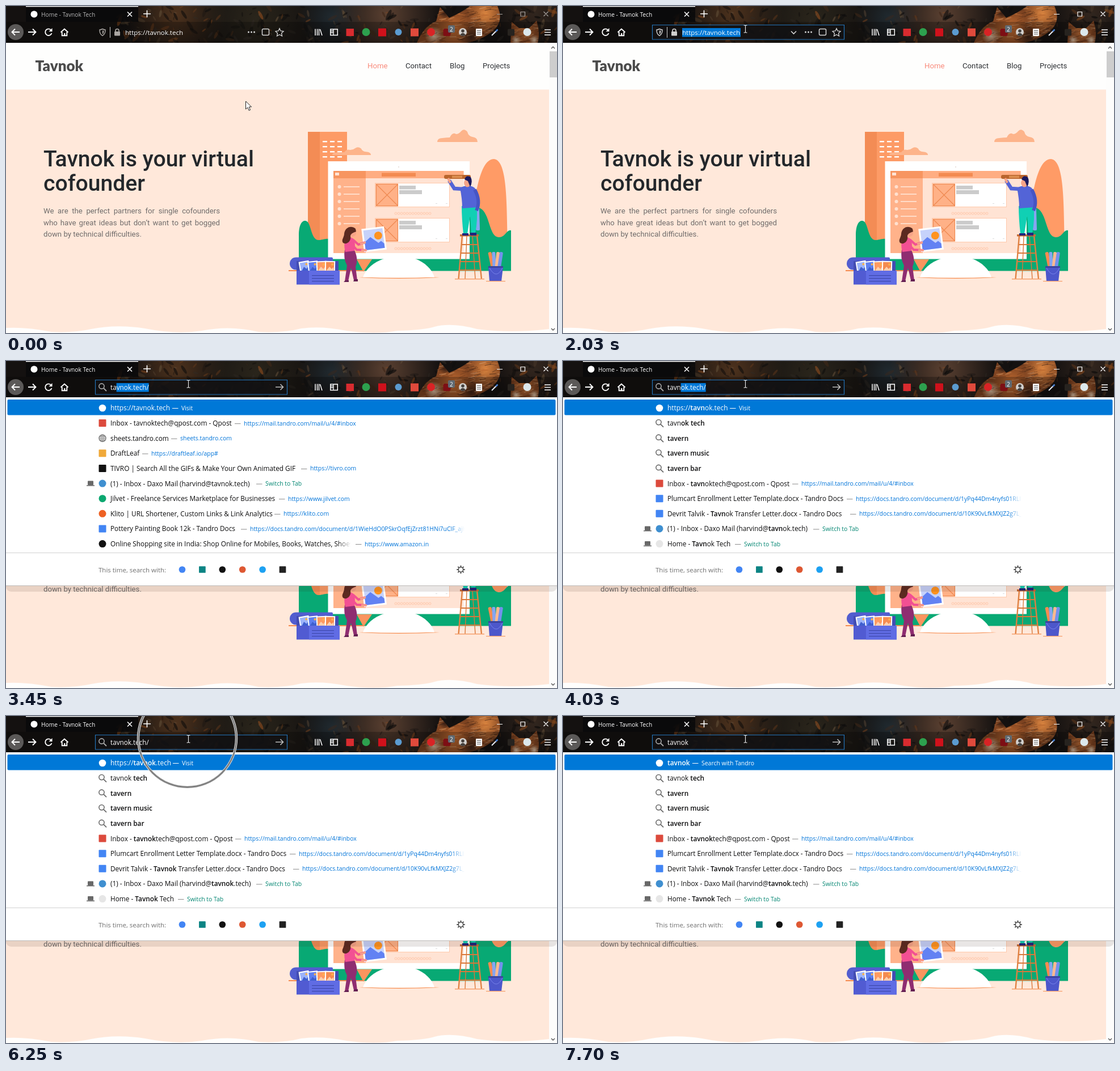
An HTML page with a canvas for the animation above (8000 ms loop, 971 by 577 pixels).

```html
<!DOCTYPE html>
<html lang="en">
<head>
<meta charset="utf-8">
<title>Address bar autofill</title>
<style>
html, body { margin: 0; width: 100%; height: 100%; overflow: hidden; background: #fff; }
canvas { display: block; width: 971px; height: 577px; }
</style>
</head>
<body>
<canvas id="stage" width="971" height="577"></canvas>
<script>
const W = 971, H = 577, LOOP = 8000;
const UI = '"Open Sans", sans-serif', WEB = 'Roboto, sans-serif';
const BLUE = '#0078d7', LINK = '#0074d9', GREEN = '#008571', GREY = '#6a6a6a';
const NAME = 'tavnok', SITE = 'https://tavnok.tech';
const stage = document.getElementById('stage').getContext('2d');
let c = stage;

// Drawing helpers
const rect = (x, y, w, h, color, r = 0) => {
  c.fillStyle = color;
  c.beginPath();
  c.roundRect(x, y, w, h, r);
  c.fill();
};
const disc = (x, y, r, color, ry = r) => {
  c.fillStyle = color;
  c.beginPath();
  c.ellipse(x, y, r, ry, 0, 0, 7);
  c.fill();
};
const ring = (x, y, r, color, w = 1.5) => {
  c.strokeStyle = color;
  c.lineWidth = w;
  c.beginPath();
  c.arc(x, y, r, 0, 7);
  c.stroke();
};
const outline = (x, y, w, h, color, width, r = 0) => {
  c.strokeStyle = color;
  c.lineWidth = width;
  c.beginPath();
  c.roundRect(x, y, w, h, r);
  c.stroke();
};
const fill = (d, color) => { c.fillStyle = color; c.fill(new Path2D(d)); };
const stroke = (d, color, w = 1.5) => {
  c.strokeStyle = color;
  c.lineWidth = w;
  c.stroke(new Path2D(d));
};
const at = (x, y, draw, angle = 0) => {
  c.save();
  c.translate(x, y);
  c.rotate(angle);
  draw();
  c.restore();
};
const text = (s, x, y, size, color, family = UI, weight = 400) => {
  c.font = `${weight} ${size}px ${family}`;
  c.fillStyle = color;
  c.fillText(s, x, y);
  return c.measureText(s).width;
};
// Asterisks toggle bold
const rich = (s, x, y, size, color) => {
  s.split('*').forEach((part, i) => { x += text(part, x, y, size, color, UI, i % 2 ? 600 : 400); });
  return x;
};
const justify = (s, x, y, width, size, color) => {
  c.font = `400 ${size}px ${WEB}`;
  const words = s.split(' ');
  const used = words.reduce((sum, w) => sum + c.measureText(w).width, 0);
  const gap = (width - used) / (words.length - 1);
  for (const w of words) x += text(w, x, y, size, color, WEB) + gap;
};
const seeded = seed => () => (seed = (seed * 16807) % 2147483647) / 2147483647;
const layer = draw => {
  const canvas = document.createElement('canvas');
  canvas.width = W;
  canvas.height = H;
  c = canvas.getContext('2d');
  draw();
  c = stage;
  return canvas;
};

// Web page
function drawScenery() {
  rect(532, 222, 69, 220, '#fd9b66');
  rect(532, 222, 21, 220, '#f38c55');
  for (const y of [238, 247, 256, 265])
    for (const x of [558, 571, 584]) rect(x, y, 8, 2.4, '#fff');
  const cloud = 'M0 22Q0 15 9 15Q17 14 22 14Q27 4 33 8Q38 8 42 3Q47 -3 53 4Q55 12 62 13Q71 14 71 22Z';
  at(760, 218, () => fill(cloud, '#fdb48b'));
  at(575, 249, () => { c.scale(.96, .64); fill(cloud, '#fdb48b'); });
  fill('M814 405C826 360 830 270 860 270C884 272 882 350 884 415L814 420Z', '#ff9b66');
  fill('M516 467V405C516 385 522 378 528 379C539 381 536 414 552 413C560 412 564 410 570 411V467Z', '#08a974');
  fill('M800 467V395C815 386 822 350 836 357C853 366 851 407 868 408C880 409 882 394 890 396V467Z', '#08a974');
  rect(567, 440, 323, 27.5, '#08a974');
  fill('M618 447H645L630 469Z', '#fa955f');
  rect(498, 466, 132, 2, '#f58b50');
}

function drawMonitor() {
  rect(567.5, 274, 249.5, 172.5, '#fff');
  disc(692, 284, 1, '#e4d9d2');
  rect(577, 291, 229.5, 145, '#ffe3d4');
  rect(577, 304, 57, 132, '#ffb28a');
  rect(577, 291, 229.5, 13, '#ffad82');
  rect(577, 291, 57, 13, '#f79560');
  rect(580, 294, 7, 5, '#ffe3d4');
  rect(662, 294.5, 60, 6.5, '#f38b52');
  for (let i = 0; i < 6; i++) {
    disc(587.5, 319 + i * 13, 3, '#ffe0cf');
    rect(595, 318 + i * 13, 28, 2, '#ffdcc8');
  }
  for (const y of [312, 374]) {
    rect(650, y, 132, 43, '#ffc9ab');
    rect(691, y + 1, 90, 41, '#fff');
    rect(652, y + 2, 39, 39, '#ffb187');
    stroke(`M652.5 ${y + 2.5}h38v38h-38zl38 38m0 -38l-38 38`, '#ee8950', 1.2);
    rect(693, y + 5, 29, 6.5, '#cbcbcb');
    rect(693, y + 13, 40, 7, '#cbcbcb');
    rect(757, y + 36, 3, 1, '#ddd');
    rect(775, y + 36, 3, 1, '#ddd');
    for (let i = 0; i < 13; i++) ring(687 + i * 5, y + 54, 2, '#ffc9ad', 1);
  }
  fill('M622 479Q692 475 764 479Q692 483 622 479Z', '#f6894a');
  fill('M629 478.5C634 464 648 452 666 446H721C738 452 751 465 755 478.5Q692 481 629 478.5Z', '#fff');
}

function drawBox() {
  rect(500, 443.5, 76, 22, '#525dcf', [11, 2, 2, 11]);
  rect(512, 450, 74, 20, '#434cb2');
  ['#9db4fa', '#5f7ff0', '#ff9a62', '#f58b50'].forEach((color, i) => at(527 + i * 15, 460, () => {
    rect(-10, -10, 18, 22, '#fff');
    rect(-8, -8, 14, 16, color);
    fill('M-8 8L-2 0L2 4L5 1L6 8Z', i < 2 ? '#3f5fcf' : '#ffd0b0');
    disc(3, -4, 2, '#ffb24c');
  }, -.16 + i * .06));
  rect(512, 467, 76, 24.5, '#515bd2');
  rect(534, 467, 54, 24.5, '#606ce4');
  for (const y of [475, 480, 485]) rect(539, y, 39, 1.3, '#3f49ad');
}

function drawWoman() {
  at(648.5, 411, () => {
    rect(-20, -20, 40, 41, '#fff');
    rect(-17, -17, 34, 35, '#c6d2fb');
    disc(8, -5, 7, '#ff9320');
    fill('M-17 18V4L-6 -4L7 8L12 5L17 10V18Z', '#6282f3');
  }, -.12);
  fill('M597 430L613 429Q622 446 616 460L619 484H613L608 462L603 486H597L601 458Q594 445 597 430Z', '#8f2d71');
  fill('M595 487H604V484H598ZM612 486H620V482H614Z', '#632052');
  fill('M599 410Q610 405 614 414Q616 424 614 432L598 434Q594 420 599 410Z', '#f25093');
  stroke('M611 412L621 421L633 417M606 417L618 430L635 431', '#f25093', 4);
  stroke('M624 420L634 417M626 431L636 431', '#f6a488', 3);
  disc(611, 400, 6, '#f6a488', 7);
  fill('M616 393C608 386 597 391 596 402C596 408 590 413 594 418C600 422 609 415 607 406Q607 401 617 398Z', '#5b2a20');
}

function drawMan() {
  stroke('M812 405L809 482M822 405L827 482', '#d9783a', 1.4);
  stroke('M804 405L797.5 482M830 405L838 482', '#e08142', 2.4);
  for (let i = 0; i < 4; i++) stroke(`M${803 - i * 1.3} ${421 + i * 15}H${831 + i * 1.6}`, '#d9783a', 2);
  rect(800, 403, 33, 3.5, '#c96b34');
  rect(791, 481, 52, 1.5, '#f6a06c');
  at(831, 376, () => rect(-3.5, -20, 7, 40, '#86a5f0', 2), -.03);
  fill('M803 353L829 351Q832 376 827 401H820L818 370L813 402H806Q803 375 803 353Z', '#10d0b4');
  fill('M804 405V401H815V405ZM818 405V400H829V405Z', '#22257c');
  rect(772, 298, 47, 7, '#b9652d', 3);
  rect(786, 299.5, 18, 4, '#dc8e50');
  stroke('M806 323L790 322L781 308', '#5364d7', 6.5);
  stroke('M783 312L779 304', '#f6a488', 4);
  fill('M800 321Q815 313 826 321Q834 334 833 355L804 357Q804 340 800 321Z', '#5364d7');
  stroke('M826 324Q837 344 829 361', '#4655c4', 6);
  disc(813, 312, 6, '#f6a488', 7.5);
  fill('M808 306Q811 297 819 302Q823 310 818 319L814 309Z', '#1b1a5e');
}

function drawBucket() {
  [['#f58b50', 855, -.2], ['#86a5f0', 860, -.05], ['#ffb98f', 866, .1], ['#7391ec', 871, .15]]
    .forEach(([color, x, a]) => at(x, 448, () => rect(-3, -14, 6, 28, color, 2), a));
  fill('M850 460H876L873 486H852Z', '#4d57cb');
  rect(850, 459, 26, 3, '#3c449f');
  stroke('M852 462Q864 484 875 462', '#7782ea', 1);
  rect(846, 485, 34, 1.2, '#f6a06c');
}

const page = layer(() => {
  rect(0, 65, W, 512, '#fefefd');
  rect(0, 147.5, 957, 430, '#ffe8da');
  text('Tavnok', 51.5, 114.5, 26, '#4b4b4b', 'Lato, sans-serif', 900);
  [['Home', 637], ['Contact', 704], ['Blog', 782], ['Projects', 840]]
    .forEach(([s, x], i) => text(s, x, 110, 13.2, i ? '#2c2f33' : '#f98b7c', WEB));
  text('Tavnok is your virtual', 66, 282.5, 39.1, '#23272b', WEB, 500);
  text('cofounder', 66, 326, 39.1, '#23272b', WEB, 500);
  justify('We are the perfect partners for single cofounders', 66, 366, 311, 13.2, '#6f6c6b');
  justify('who have great ideas but don’t want to get bogged', 66, 386.5, 311, 13.2, '#6f6c6b');
  text('down by technical difficulties.', 66, 407, 13.2, '#6f6c6b', WEB);
  drawScenery();
  drawMonitor();
  drawBox();
  drawWoman();
  drawMan();
  drawBucket();
  fill('M0 577V568Q35 566 80 575Q120 577 150 570Q195 561 245 569Q300 580 345 573Q395 563 445 575Q490 577 520 569Q555 564 600 573Q650 580 690 573Q735 572 755 566Q785 558 830 570Q890 578 957 570V577Z', '#fffefd');
  rect(957, 65, 14, 512, '#fdfdfc');
  rect(958, 80, 13, 46, '#cdcdcd');
  stroke('M961 75L964 72L967 75M961 569L964 572L967 569', '#555', 1.4);
});

// Browser frame
const glow = (x, y, r, color) => {
  const g = c.createRadialGradient(x, y, 0, x, y, r);
  g.addColorStop(0, color);
  g.addColorStop(1, color + '00');
  rect(x - r, y - r, r * 2, r * 2, g);
};

function drawLeaves(rnd) {
  const shades = ['#8a4a1d', '#3f2818', '#0b0a0a', '#5d4a35', '#0e0d0d', '#302a24'];
  for (let i = 0; i < 260; i++) {
    const x = 200 + rnd() * 770, y = rnd() * 65, r = 1.5 + rnd() * 5;
    c.globalAlpha = .25 + rnd() * .4;
    at(x, y, () => disc(0, 0, r * 1.6, shades[i % 6], r * .5), rnd() * 6);
  }
  c.globalAlpha = 1;
}

function drawFur(outlinePath, x0, x1, lights, shades, rnd) {
  c.save();
  c.clip(new Path2D(outlinePath));
  rect(x0, 0, x1 - x0, 65, '#7d4321');
  for (const [x, y, r, color] of lights) glow(x, y, r, color);
  for (let i = 0; i < (x1 - x0) * 1.6; i++) {
    const x = x0 + rnd() * (x1 - x0), y = rnd() * 65;
    c.globalAlpha = .2 + rnd() * .3;
    at(x, y, () => rect(-6, -.7, 12, 1.4, shades[i % shades.length], 1), -.5 + rnd() * .7);
  }
  c.restore();
}

function drawFoxes(rnd) {
  const shades = ['#d98544', '#4a2614', '#b5642f', '#e0b58c', '#2a1710'];
  drawFur('M724 65Q736 36 758 27L765 2L781 21Q802 12 818 0H866Q876 22 864 38Q846 58 812 65Z', 722, 876,
    [[790, 40, 34, '#c06a30'], [845, 14, 32, '#d9843f'], [754, 52, 16, '#d8bda2'], [775, 12, 12, '#2b1811'], [820, 55, 22, '#3c2114']],
    shades, rnd);
  drawFur('M889 65L891 28L904 39H922L935 26Q942 48 937 65Z', 886, 942,
    [[914, 45, 20, '#c8743c'], [899, 60, 9, '#d8bda2'], [931, 60, 9, '#d8bda2']],
    shades, rnd);
}

const chrome = layer(() => {
  c.beginPath();
  c.rect(0, 0, W, 65);
  c.clip();
  rect(0, 0, W, 65, '#141110');
  [[300, 14, 90, '#4d321d'], [440, 22, 110, '#2a251b'], [575, 20, 60, '#202a30'], [670, 15, 95, '#5a4031'], [930, 10, 70, '#33261e']]
    .forEach(spot => glow(...spot));
  const rnd = seeded(41);
  drawLeaves(rnd);
  drawFoxes(rnd);
  rect(0, 28, W, 37, 'rgba(0,0,0,.25)');
  rect(35, 0, 198, 28, 'rgba(10,10,11,.88)');
  rect(35, 0, 198, 1.5, '#f4f4f4');
  disc(49.5, 14.5, 6, '#fff');
  stroke('M214 10.5L222 18.5M222 10.5L214 18.5M248.5 7.5V20M242 13.7H255', '#fff', 1.6);
  disc(17, 46, 14, '#5b5958');
  stroke('M24 46H11M16 40.5L10.5 46L16 51.5M39 46H52M47 40.5L52.5 46L47 51.5', '#fff', 1.9);
  stroke('M79.5 42.5A5.8 5.8 0 1 0 80.5 48', '#fff', 1.9);
  fill('M81.5 39V45H75.5Z', '#fff');
  stroke('M96.5 46.5L103 40.5L109.5 46.5M98.7 46V52.3H107.3V46', '#fff', 1.9);
  fill('M102 48h2.4v4H102Z', '#fff');
  stroke('M545 40.5V52M548.5 40.5V52M551.5 40.5V52M553.5 41L557 52', '#fff', 1.5);
  outline(571.8, 41, 12.5, 10.5, '#fff', 1.5);
  stroke('M577 41V51.5M572 44H577M572 47H577', '#fff', 1.3);
  rect(599.5, 40, 13.5, 13, '#d92b2f');
  disc(634.5, 46, 7, '#2da04e');
  rect(656, 39.5, 14, 14, '#d0111b');
  disc(691.5, 46, 6, '#5b9bd0');
  rect(713, 39.5, 14, 14, '#e04a3c');
  disc(749, 46, 7, '#d92325');
  rect(770.5, 40, 13, 13, '#7d0f14', 3);
  rect(779, 34, 12, 13, '#606a72', 2);
  text('2', 782, 44.5, 10, '#fff');
  disc(805, 46, 7, '#d2d0ce');
  disc(805, 44, 2.8, '#44403d');
  fill('M800 51Q805 44 810 51Q805 55 800 51Z', '#44403d');
  rect(828, 40, 11, 13, '#f5f5f5', 1);
  for (const y of [43, 46, 49]) rect(830, y, 7, 1, '#666');
  stroke('M856 52L864 44', '#e8ecf5', 2);
  stroke('M863 45L866.5 41.5', '#4c83d4', 2.5);
  rect(884, 40.5, 12, 12, '#27231f', 2);
  disc(918.5, 46, 7, '#dce8ec');
  stroke('M949 42H960M949 46.5H960M949 51H960', '#fff', 1.7);
});

function drawMagnifier(x, y, color) {
  ring(x - 1.5, y - 1.5, 4.6, color, 1.6);
  stroke(`M${x + 2} ${y + 2}L${x + 7} ${y + 7}`, color, 1.8);
}

function drawWindowState(active) {
  text('Home - Tavnok Tech', 62, 18.7, 10.2, active ? '#fff' : '#b5b5b5');
  stroke('M865 14.5H875M907 10.5H914.5V18H907ZM947.5 10L955.5 18M955.5 10L947.5 18', active ? '#fff' : '#a5a09d', 1.2);
}

// Typed letters over time, and the letters the result list has caught up with
const latest = (steps, t) => steps.reduce((v, [when, n]) => t >= when ? n : v, 0);
const TYPED = [[3330, 1], [3450, 2], [3690, 3], [3910, 4], [4150, 5], [4380, 6]];
const MATCHED = [[4030, 4], [4260, 5], [4490, 6]];

function drawSiteIcons(hover) {
  const color = hover ? '#d0d0d0' : '#aaa6a3';
  stroke('M170 40.5Q173 42 175 42Q175.5 49 170 52.5Q164.5 49 165 42Q167 42 170 40.5Z', color, 1.4);
  fill('M170 43V50Q172.5 48 172.5 44Z', color);
  rect(183, 37, 1, 19, '#d0d0d0');
  rect(191, 45, 10, 7.5, color, 1);
  stroke('M193 46V43.5A3 3 0 0 1 199 43.5V46', color, 1.7);
  for (const x of [427.5, 432.5, 437.5]) disc(x, 46, 1.5, '#d5d5d5');
  outline(451.5, 40.5, 12, 11, '#d5d5d5', 1.5, 2);
  stroke('M482 39.5L484 44L489 44.7L485.5 48L486.5 53L482 50.5L477.5 53L478.5 48L475 44.7L480 44Z', '#d5d5d5', 1.3);
  if (hover) stroke('M402 44.5L406.5 49L411 44.5', '#d5d5d5', 1.6);
}

function drawAddressBar(t) {
  const typed = latest(TYPED, t);
  if (t >= 1900) {
    rect(157.5, 33.5, 338, 25.5, 'rgba(18,18,20,.82)');
    outline(157.5, 33.5, 338, 25.5, '#2373b8', 1.2);
  }
  const mark = (x0, x1) => rect(x0, 39, x1 - x0, 15.5, BLUE);
  if (!typed) {
    drawSiteIcons(t >= 1200);
    if (t >= 2030) mark(210, 313);
    text(SITE, 210, 51.2, 11.55, '#fff');
    return;
  }
  drawMagnifier(170, 46, '#a9a9a9');
  stroke('M475 46H488M483.5 41L488.5 46L483.5 51', '#bdbdbd', 1.6);
  c.font = `400 11.7px ${UI}`;
  const full = NAME + '.tech/';
  const edge = n => 184 + c.measureText(full.slice(0, n)).width;
  if (t < 4870) mark(edge(typed), edge(12));
  else if (t >= 6960 && t < 7570) mark(edge(6), edge(t < 7080 ? 11 : 12));
  text(t < 7570 ? full : NAME, 184, 51.2, 11.7, '#fff');
  const caret = t >= 4870 && t < 5110 || t >= 5570 && t < 6030 || t >= 6460 && t < 6960;
  if (caret) rect(Math.round(edge(6)), 39, 1, 15, '#fff');
}

// Result rows: icon, title, start of the trailing text, trailing text, address of an open tab
const MAIL = 'https://mail.daxo.com/zm/#mail/folder/inbox';
const RECENT = [
  ['square#dc4a3d', 'Inbox - tavnoktech@qpost.com - Qpost', 419, 'https://mail.tandro.com/mail/u/4/#inbox'],
  ['globe', 'sheets.tandro.com', 307, 'sheets.tandro.com'],
  ['square#f0a93a', 'DraftLeaf', 256, 'https://draftleaf.io/app#'],
  ['square#111111', 'TIVRO | Search All the GIFs & Make Your Own Animated GIF', 536, 'https://tivro.com'],
  ['disc#3f8fd0', '(1) - Inbox - Daxo Mail (harvind@tavnok.tech)', 457, 'Switch to Tab', MAIL],
  ['disc#0ba870', 'Jilvet - Freelance Services Marketplace for Businesses', 497, 'https://www.jilvet.com'],
  ['disc#ee6123', 'Klito | URL Shortener, Custom Links & Link Analytics', 489, 'https://klito.com'],
  ['square#4285f4', 'Pottery Painting Book 12k - Tandro Docs', 430, 'https://docs.tandro.com/document/d/1WieHdO0PSkrOqfEjZrzt81HNi7uClF_ajHqPz'],
  ['disc#111111', 'Online Shopping site in India: Shop Online for Mobiles, Books, Watches, Shoes and More', 632, 'https://www.amazon.in'],
];
const MATCHES = [
  ['search', 'tavnok tech'],
  ['search', 'tavern'],
  ['search', 'tavern music'],
  ['search', 'tavern bar'],
  ['square#dc4a3d', 'Inbox - tavnoktech@qpost.com - Qpost', 420, 'https://mail.tandro.com/mail/u/4/#inbox'],
  ['square#4285f4', 'Plumcart Enrollment Letter Template.docx - Tandro Docs', 516, 'https://docs.tandro.com/document/d/1yPq44Dm4nyfs01RLlDTkw'],
  ['square#4285f4', 'Devrit Talvik - Tavnok Transfer Letter.docx - Tandro Docs', 522, 'https://docs.tandro.com/document/d/10K90vLfkMXJZ2g7L_Rbqa'],
  ['disc#3f8fd0', '(1) - Inbox - Daxo Mail (harvind@tavnok.tech)', 457, 'Switch to Tab', MAIL],
  ['disc#e6e6e6', 'Home - Tavnok Tech', 319, 'Switch to Tab', SITE],
];

function drawIcon(kind, x, y) {
  const [shape, color] = kind.split('#');
  if (shape === 'search') drawMagnifier(x, y, GREY);
  else if (shape === 'disc') disc(x, y, 6.5, '#' + color);
  else if (shape === 'square') rect(x - 6.5, y - 6.5, 13, 13, '#' + color, 1);
  else {
    ring(x, y, 6, GREY, 1.3);
    stroke(`M${x - 6} ${y}h12M${x} ${y - 6}v12M${x - 5} ${y - 3}h10M${x - 5} ${y + 3}h10`, GREY, .8);
    c.beginPath();
    c.ellipse(x, y, 2.8, 6, 0, 0, 7);
    c.stroke();
  }
}

const fadeOut = (x, y) => {
  const g = c.createLinearGradient(x - 24, 0, x, 0);
  g.addColorStop(0, '#fff0');
  g.addColorStop(1, '#fff');
  rect(x - 24, y - 12, 24, 24, g);
  rect(x, y - 12, W - x, 24, '#fff');
};

function embolden(title, query, suggestion) {
  if (!query) return title;
  if (!suggestion) return title.replace(new RegExp(query, 'i'), '*$&*');
  return title.startsWith(query) ? `${query}*${title.slice(query.length)}` : `*${title}`;
}

function drawRow([icon, title, x, tail, address], y, query, override) {
  drawIcon(icon, 170, y);
  const end = rich(embolden(title, query, icon === 'search'), 184, y + 4.5, 11.8, '#0c0c0d');
  if (!tail) return;
  if (end > x + 4) fadeOut(x - 24, y);
  rect(x - 16, y + .5, 10.5, 1, '#8a8a8a');
  const tabLink = address && !override;
  if (tabLink) {
    rect(144, y - 4.5, 10, 7.5, '#686868', 1);
    rect(142, y + 3, 14, 1.5, '#686868');
  }
  const stop = x + text(address && override ? address : tail, x, y + 4, 10.45, tabLink ? GREEN : LINK);
  if (stop > 808) fadeOut(808, y);
}

function drawTopRow(t, query) {
  rect(2.5, 68, 966, 27.5, BLUE, 2);
  disc(170, 83, 6.3, '#fff');
  const searching = t >= 7700;
  const x = searching ? 244 : query ? 310 : 309;
  rich(searching ? `*${NAME}` : embolden(SITE, query), 184, 87.2, 11.9, '#fff');
  rect(x - 16, 83, 10.5, 1, '#fff');
  text(searching ? 'Search with Tandro' : 'Visit', x, 87, 10.45, '#fff');
}

function drawDropdown(t) {
  if (t < 3330) return;
  const open = t >= 3450, bottom = open ? 397 : 157, y = bottom - 29;
  const query = NAME.slice(0, latest(MATCHED, t));
  const override = t >= 6030 && t < 6140 || t >= 6460 && t < 7330;
  rect(0, bottom, W, 10, 'rgba(60,35,20,.11)', [0, 0, 9, 9]);
  rect(0, 64, W, bottom - 64, '#fff');
  rect(0, bottom - 1, W, 1, '#bdbab8');
  rect(0, bottom - 59, W, 1, '#d2d2d2');
  drawTopRow(t, query);
  if (open) (query ? MATCHES : RECENT).forEach((row, i) => drawRow(row, 109.6 + i * 26.62, query, override));
  text('This time, search with:', 163, y + 4.5, 11.5, '#6f6f6f');
  ['disc#4285f4', 'square#0c8484', 'disc#111111', 'disc#de5833', 'disc#1da1f2', 'square#222222']
    .forEach((icon, i) => at(310.5 + i * 35.4, y, () => { c.scale(.9, .9); drawIcon(icon, 0, 0); }));
  ring(801.5, y, 4.2, '#4b4b4b', 1.5);
  for (let i = 0; i < 8; i++)
    at(801.5, y, () => rect(-.9, -7.3, 1.8, 3.3, '#4b4b4b'), i * Math.PI / 4);
}

function pointerAt(t) {
  if (t < 120) return [422.5, 168];
  if (t < 830) {
    const k = Math.min(3, Math.floor((t - 120) / 120) + 1) / 3;
    return [422.5 - 6 * k, 168 - k];
  }
  const k = Math.min(6, Math.floor((t - 830) / 116) + 1) / 6;
  const e = k * k * (3 - 2 * k);
  return [416.5 - 95 * e, 167 - 126.5 * e];
}

function drawPointer(t) {
  const [x, y] = pointerAt(t);
  at(x, y, () => {
    if (y < 60) {
      stroke('M-3 -6.5H-1L0 -5.5L1 -6.5H3M0 -5.5V5.5M-3 6.5H-1L0 5.5L1 6.5H3', '#eee', 1.1);
    } else {
      const arrow = 'M0 0V14L3.3 11L5.6 16.3L8 15.3L5.7 10H10Z';
      fill(arrow, '#fff');
      stroke(arrow, '#222', 1);
    }
  });
}

function drawLocator(t) {
  if (t < 6250 || t >= 6460) return;
  const r = t < 6360 ? 86.5 : 40;
  ring(319.5, 39, r, '#e2e2e2', 4.5);
  ring(319.5, 39, r, '#808080', 2.8);
}

const start = performance.now();
function frame() {
  const t = (performance.now() - start) % LOOP;
  c.drawImage(page, 0, 0);
  c.drawImage(chrome, 0, 0);
  drawWindowState(t >= 1900);
  drawAddressBar(t);
  drawDropdown(t);
  drawLocator(t);
  drawPointer(t);
  requestAnimationFrame(frame);
}
frame();
</script>
</body>
</html>
```
